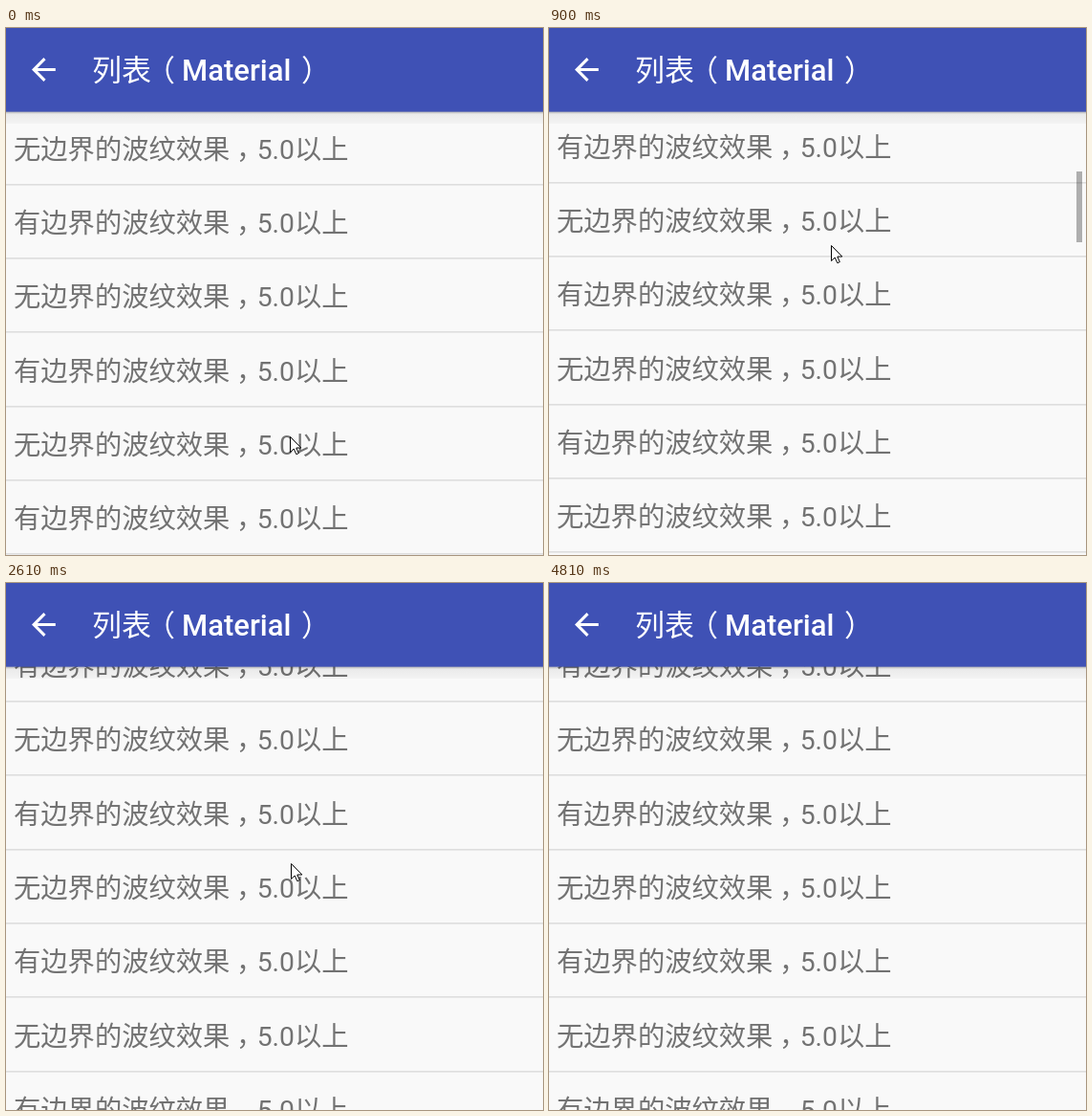
These frames come from a looping animation (562x551 px, 5250 ms). An HTML page with a canvas:

```html
<!DOCTYPE html>
<html lang="zh-CN">
<head>
<meta charset="utf-8">
<style>
html, body { margin: 0; width: 100%; height: 100%; overflow: hidden; background: #f9f9f9; }
canvas { display: block; }
</style>
</head>
<body>
<canvas width="562" height="551"></canvas>
<script>
const ctx = document.querySelector('canvas').getContext('2d');
const W = 562, H = 551, LOOP = 5250, TICK = 1000 / 17;
const BAR = 87, PITCH = 77.33, DRAG = 209.6, TOTAL = 581.2;
const FONT = 'Roboto, "Noto Sans CJK SC", "Noto Sans CJK", sans-serif';

// Times are in ticks, except for presses, which are in ms.
const pointerStart = { x: 297, y: 427 };
const moves = [
  { from: -1, to: 3, x: 306, y: 226 },
  { from: 3, to: 6, x: 296, y: 149 },
  { from: 11, to: 17, x: 293, y: 304 },
  { from: 29, to: 34, x: 311, y: 241 },
  { from: 40, to: 44, x: 294, y: 310 },
  { from: 48, to: 51, x: 301, y: 389 },
  { from: 77, to: 79, x: 465, y: 528 }
];
const presses = [
  { row: 10, on: 1190, off: 1840 },
  { row: 9, on: 2370, off: 2490 },
  { row: 11, on: 3330, off: 3770 },
  { row: 11, on: 4270, off: 4450 }
];

const arrow = new Path2D('M20 11H7.83l5.59-5.59L12 4l-8 8 8 8 1.41-1.41L7.83 13H20z');
const pointer = new Path2D('M.5.5V16.5L4.2 13 6.8 18.7 9.3 17.6 6.8 12H11.8Z');
const shadow = ctx.createLinearGradient(0, BAR, 0, 100);
shadow.addColorStop(0, 'rgba(0,0,0,.3)');
shadow.addColorStop(.25, 'rgba(0,0,0,.06)');
shadow.addColorStop(1, 'rgba(0,0,0,.025)');

const clamp = v => Math.max(0, Math.min(1, v));

function rect(color, x, y, w, h) {
  ctx.fillStyle = color;
  ctx.fillRect(x, y, w, h);
}

// Drag at constant speed, then a decelerating fling.
function scrollAt(n) {
  if (n < 3) return DRAG * (n + 1) / 4;
  return TOTAL - (TOTAL - DRAG) * clamp((17 - n) / 14) ** 1.4865;
}

function pointerAt(n) {
  let { x, y } = pointerStart;
  for (const m of moves) {
    const k = clamp((n - m.from) / (m.to - m.from));
    x += (m.x - x) * k;
    y += (m.y - y) * k;
  }
  return [Math.round(x), Math.round(y)];
}

function drawList(t, scroll) {
  ctx.font = '28.3px ' + FONT;
  const first = Math.max(0, Math.floor(scroll / PITCH) - 1);
  for (let i = first; i < first + 9; i++) {
    const top = Math.floor(BAR + PITCH * i - scroll);
    const bottom = Math.floor(BAR + PITCH * (i + 1) - scroll);
    if (presses.some(p => p.row === i && t >= p.on && t < p.off))
      rect('#d7d7d7', 0, top - 1, W, PITCH);
    rect('#dedede', 0, bottom - 1, W, 1.6);
    ctx.fillStyle = 'rgba(0,0,0,.54)';
    ctx.fillText((i % 2 ? '有' : '无') + '边界的波纹效果', 8, bottom - 27);
    ctx.fillText('，', 241, bottom - 27);
    ctx.fillText('5.0以上', 262.7, bottom - 27);
  }
}

function drawToolbar() {
  rect(shadow, 0, BAR, W, 13);
  rect('#3f51b5', 0, 0, W, BAR + .6);
  ctx.fillStyle = '#fff';
  ctx.save();
  ctx.translate(20.8, 24.9);
  ctx.scale(1.55, 1.55);
  ctx.fill(arrow);
  ctx.restore();
  ctx.font = '500 31px ' + FONT;
  ctx.fillText('列表', 90, 55);
  ctx.fillText('（', 146, 55);
  ctx.fillText('Material', 184, 55);
  ctx.fillText('）', 309, 55);
}

function drawPointer([x, y]) {
  ctx.save();
  ctx.translate(x, y);
  ctx.fillStyle = '#fff';
  ctx.strokeStyle = '#000';
  ctx.fill(pointer);
  ctx.stroke(pointer);
  ctx.restore();
}

function draw(t) {
  const n = Math.max(-1, Math.floor((t - 69) / TICK));
  const scroll = scrollAt(n);
  rect('#f9f9f9', 0, 0, W, H);
  drawList(t, scroll);
  if (n >= 0) {
    const alpha = .3 * clamp((1620 - t) / 250);
    rect(`rgba(0,0,0,${alpha})`, 552, Math.round(93 + scroll / 9.55), 6, 74);
  }
  drawToolbar();
  if (t < 4810) drawPointer(pointerAt(n));
}

function loop() {
  draw(performance.now() % LOOP);
  requestAnimationFrame(loop);
}
loop();
</script>
</body>
</html>
```
